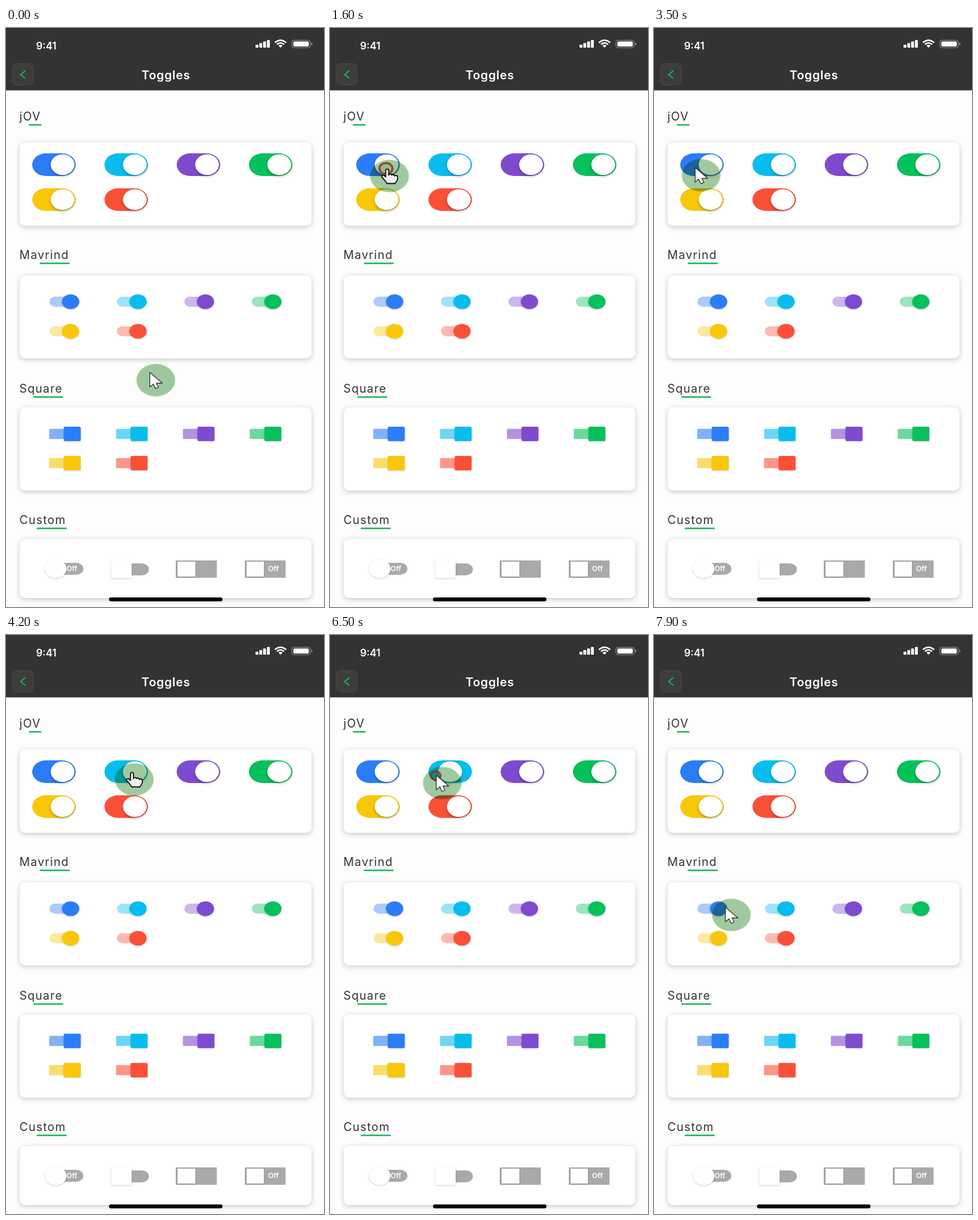
An HTML page for the animation above (8000 ms loop, 534 by 970 pixels).

```html
<!DOCTYPE html>
<html lang="en">
<head>
<meta charset="utf-8">
<title>Toggles</title>
<style>
  html, body { margin: 0; width: 100%; height: 100%; overflow: hidden; background: #fdfdfd; }
  svg { display: block; width: 100%; height: 100%; font-family: Inter, sans-serif; }
  .card { fill: #fff; filter: drop-shadow(0 2px 4px rgba(0,0,0,.22)); }
  .knob { filter: drop-shadow(0 2px 2px rgba(0,0,0,.32)); }
  .soft { filter: drop-shadow(0 1px 1.5px rgba(0,0,0,.2)); }
  .heading { font-size: 19.5px; letter-spacing: 1.2px; fill: #333; }
  .underline { stroke: #14b85c; stroke-width: 2.4; stroke-linecap: round; }
  .off { font-size: 12px; font-weight: 600; fill: #fff; }
  #halo { fill: #9fc99f; stroke: #c3d9a4; mix-blend-mode: multiply; }
  #ring { fill: rgba(120,60,20,.12); stroke: rgba(135,50,22,.8); stroke-width: 3.5; }
</style>
</head>
<body>
<svg viewBox="0 0 534 970" preserveAspectRatio="none">
  <rect width="534" height="104.5" fill="#333"/>
  <g fill="#fff" font-weight="600">
    <text x="50.5" y="36" font-size="17">9:41</text>
    <text x="268.5" y="86" font-size="20" letter-spacing=".7" text-anchor="middle">Toggles</text>
    <g id="signal"></g>
    <path d="M461 33L457.500 29.500Q461 27 464.500 29.500Z"/>
    <rect x="482.500" y="22.500" width="26" height="8.500" rx="2"/>
    <path d="M513 24.500q2 2.200 0 4.500z"/>
  </g>
  <path d="M451.500 24.500Q461 16.500 470.500 24.500M455 27.500Q461 22.500 467 27.500" fill="none" stroke="#fff" stroke-width="2.400"/>
  <rect x="480" y="20.500" width="31" height="12.500" rx="3.500" fill="none" stroke="#999"/>
  <rect x="10.500" y="59.500" width="35" height="36" rx="7" fill="#3d3d3d" stroke="#484848"/>
  <path d="M32.500 71.500L24.500 78L32.500 84.500" fill="none" stroke="#12b856" stroke-width="2"/>

  <g id="panels"></g>
  <g id="toggles"></g>

  <g fill="#a9a9a9">
    <rect x="78" y="896" width="52" height="20" rx="12" ry="10"/>
    <path d="M200 897h28a12 10 0 0 1 0 20h-28z"/>
    <rect x="285" y="892" width="69" height="29"/>
    <rect x="401" y="892" width="68.500" height="29"/>
  </g>
  <g fill="#fff" class="soft">
    <ellipse cx="83.500" cy="906" rx="18" ry="15.500"/>
    <rect x="177" y="892" width="34" height="29.500" rx="2"/>
    <rect x="288" y="894" width="30" height="25"/>
    <rect x="404" y="894" width="29" height="25"/>
  </g>
  <text class="off" x="101.500" y="910">Off</text>
  <text class="off" x="440" y="910">Off</text>
  <rect x="173" y="954" width="190.500" height="6.500" rx="3.200"/>

  <ellipse id="halo" rx="32.300" ry="27"/>
  <ellipse id="ring"/>
  <path id="arrow" fill="#fff" stroke="#333" stroke-width="1.300" stroke-linejoin="round"
    d="M0 0V24.500L6 19.500L9.500 27L14.500 25L11 18H21Z"/>
  <path id="hand" fill="#f3eeee" stroke="#111" stroke-width="1.800" stroke-linejoin="round"
    d="M-3 1.500C-3-.8 2-.8 2 1.500V10C2 7.500 7 7.500 7 10C7.500 8.500 12 9 12 11.500C13 10 17 10.500 17 13V16C17 20 14 21 13 24H-1C-3 20-6 17-9 14C-11 11-7 9-5 11L-3 13Z"/>
</svg>
<script>
const LOOP = 8000, STEP = 100, OFF_COLOR = '#aaa', LEFT = 22.5;
const COLORS = ['#2b7df7', '#08bdee', '#7e4bcf', '#05c15b', '#f9c70a', '#fb5038'];
const PILL_X = 44, PILL_GAP = 121.3;
const $ = id => document.getElementById(id);
const smooth = v => (v = Math.max(0, Math.min(1, v)), v * v * (3 - 2 * v));

for (let i = 0; i < 4; i++) {
  const height = 5 + i * 2.7;
  $('signal').innerHTML +=
    `<rect x="${419 + i * 6.4}" y="${33 - height}" width="4.8" height="${height}" rx="1"/>`;
}

function addPanel(name, baseline, top, bottom) {
  $('panels').insertAdjacentHTML('beforeend', `
    <text class="heading" x="${LEFT}" y="${baseline}">${name}</text>
    <rect class="card" x="23" y="${top}" width="490" height="${bottom - top}" rx="9"/>`);
  const width = $('panels').querySelector('text:last-of-type').getComputedTextLength();
  const right = LEFT + width, y = baseline + 7.3;
  $('panels').insertAdjacentHTML('beforeend',
    `<path class="underline" d="M${right - Math.min(48, width - 17)} ${y}H${right}"/>`);
}
addPanel('jOV', 155, 191.5, 331.5);
addPanel('Mavrind', 387, 414.5, 553.5);
addPanel('Square', 611, 635.5, 775);
addPanel('Custom', 831, 856, 955);

// Lays the six colours out as a row of four and a row of two
function addToggles(x, gapX, y, gapY, draw) {
  $('toggles').innerHTML += COLORS.map((color, i) =>
    draw(x + i % 4 * gapX, y + Math.floor(i / 4) * gapY, color, i)).join('');
}
addToggles(PILL_X, PILL_GAP, 229, 58.5, (x, y, color, i) => `
  <rect id="track${i}" x="${x}" y="${y - 19}" width="73" height="38" rx="23" ry="19" fill="${color}"/>
  <ellipse id="knob${i}" class="knob" cx="${x + 51}" cy="${y}" rx="20" ry="17.3" fill="#fff"/>`);
addToggles(108.5, 113.2, 458.5, 49.5, (x, y, color) => `
  <rect x="${x - 35.5}" y="${y - 8.5}" width="40" height="17" rx="10" ry="8.5" fill="${color}" opacity=".4"/>
  <ellipse class="soft" cx="${x}" cy="${y}" rx="14.5" ry="12.3" fill="${color}"/>`);
addToggles(97, 112.3, 680, 49, (x, y, color) => `
  <rect x="${x - 24.5}" y="${y - 8.5}" width="27" height="17" rx="1.5" fill="${color}" opacity=".6"/>
  <rect class="soft" x="${x}" y="${y - 12}" width="28.5" height="24" rx="2" fill="${color}"/>`);

// Key points of the pointer: time, x, y
const path = [
  [100, 251.5, 590], [1000, 106, 251], [1600, 100, 248], [2000, 107, 259],
  [2700, 86, 242], [3400, 73, 247], [4200, 215.5, 242], [4600, 208, 258],
  [5500, 218, 252], [6500, 188.5, 248], [7400, 168, 461], [7900, 130, 469]
];

function pointerAt(t) {
  const next = path.findIndex(p => p[0] > t);
  if (next <= 0) return (next ? path.at(-1) : path[0]).slice(1);
  const [t0, x0, y0] = path[next - 1], [t1, x1, y1] = path[next];
  const k = smooth((t - t0) / (t1 - t0));
  return [x0 + (x1 - x0) * k, y0 + (y1 - y0) * k];
}

function place(id, x, y, visible = true) {
  $(id).setAttribute('transform', `translate(${x} ${y})`);
  $(id).style.display = visible ? '' : 'none';
}

function render(t) {
  const [x, y] = pointerAt(t);
  const hand = t >= 1000 && t < 3500 || t >= 4100 && t < 6300;

  // Evenly spaced clicks: first toggle off and on, then the second
  const clickTime = i => 1520 + 1595 * i;
  const flip = i => smooth((t - clickTime(i) - 115) / 160);
  for (let i = 0; i < 2; i++) {
    const on = 1 - flip(2 * i) + flip(2 * i + 1);
    $('knob' + i).setAttribute('cx', PILL_X + PILL_GAP * i + 22 + 29 * on);
    $('track' + i).setAttribute('fill', on > .3 ? COLORS[i] : OFF_COLOR);
  }

  const lastClick = Math.min(3, Math.floor((t - clickTime(0)) / 1595));
  const age = t - clickTime(lastClick);
  const radius = Math.max(0, 13 - age * .025);
  $('ring').setAttribute('rx', radius);
  $('ring').setAttribute('ry', radius * .85);
  place('ring', x - (hand ? 6 : 11), y - 12.5, lastClick >= 0 && age < 280);
  place('halo', x, y);
  place('arrow', x - 10, y - 13, !hand);
  place('hand', x - 3.5, y - 11.5, hand);
}

function frame(now) {
  render(Math.floor(now % LOOP / STEP) * STEP);
  requestAnimationFrame(frame);
}
requestAnimationFrame(frame);
</script>
</body>
</html>
```
